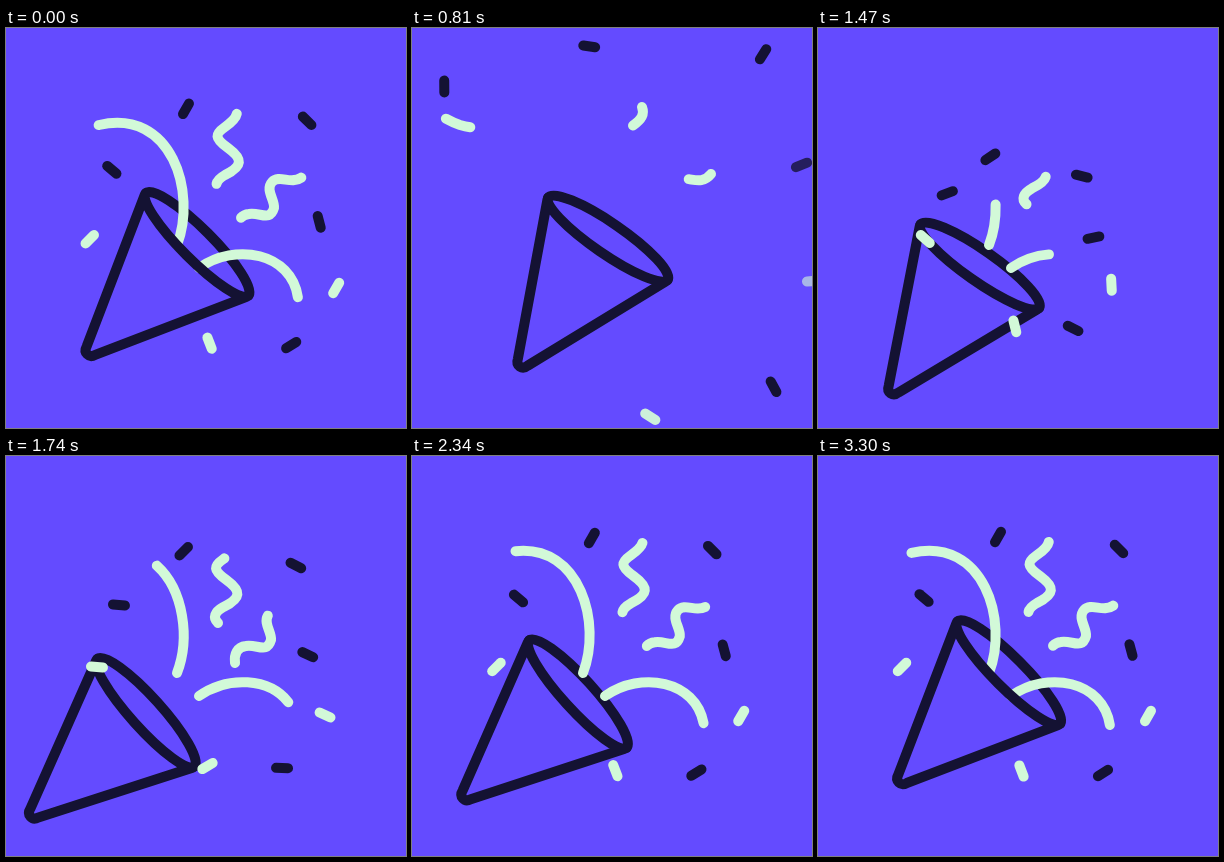
An HTML page with a canvas for the animation above (3330 ms loop, 400 by 400 pixels).

```html
<!DOCTYPE html>
<html lang="en">
<head>
<meta charset="utf-8">
<title>Party popper</title>
<style>
  html, body { margin: 0; height: 100%; overflow: hidden; background: #644bff; }
  canvas { display: block; width: 100vw; height: 100vh; }
</style>
</head>
<body>
<canvas id="stage" width="400" height="400"></canvas>
<script>
const ctx = document.getElementById('stage').getContext('2d');
const LOOP = 3330, BG = '#644bff', DARK = '#141233', LIGHT = '#d2f9d8';
const clamp = v => Math.max(0, Math.min(1, v));
const smooth = v => (v = clamp(v), v * v * (3 - 2 * v));

// Cone pose: time, rim centre x, y, tilt in degrees
const poses = [
  [0, 191, 216.5, 45], [420, 194.5, 213, 41], [850, 196, 210.5, 34],
  [1230, 196.3, 208.8, 30], [1320, 195, 209, 30], [1470, 162, 238, 35],
  [1560, 145, 251, 39.5], [1620, 137, 258, 43.5], [1680, 136, 260, 46.5],
  [1740, 139.8, 256.8, 48], [2160, 155.5, 247.5, 48.6], [2340, 165.8, 238.1, 47.8],
  [2700, 181, 225.6, 46], [2820, 185.5, 221.5, 45.5], [LOOP, 191, 216.5, 45]
];

// Rest pose, travel outwards (by 420 ms), fade end, and offset still left at 1740 ms
const bits = [
  { color: DARK, rest: [180, 81, -60], out: [-2, -45, -90], gone: 1240, left: [-2.3, 14.4, 15], born: 1200 },
  { color: DARK, rest: [301, 93, 45], out: [36, -48, -83], gone: 1360, left: [-11.2, 16.6, -18], born: 1200 },
  { color: DARK, rest: [106, 142, 40], out: [-53, -60, 40], gone: 1090, left: [7, 7, -35], born: 1320 },
  { color: DARK, rest: [313, 194, 75], out: [55, -41, 67], gone: 1000, left: [-11.3, 4.7, -50], born: 1200 },
  { color: DARK, rest: [285, 317, -32], out: [55, 30, -70], gone: 1090, left: [-9, -5, 34], born: 1380 },
  { color: LIGHT, rest: [84, 211, -45], out: [-68, 68, -72], gone: 900, left: [7, 0, 50], born: 1380 },
  { color: LIGHT, rest: [330, 260, -60], out: [51, -5, 45], gone: 960, left: [-11, -1, 85], born: 1380 },
  { color: LIGHT, rest: [203.5, 315, 69], out: [25, 53, -30], gone: 1040, left: [-2, -5, -100], born: 1380 }
];

// Streamers are dashes sliding along fixed curves; tail and head are arc lengths at rest
const streamers = [
  { d: 'M171 217C191 165 166 80 93 97C75 101 62 101 48 97Q36 93 25 85', drift: [0, 0],
    tail: 0, head: 177, push: 74, pull: 245, power: 1.4, start: 1380, tau: 343 },
  { d: 'M193 240C230 214 286 225 292 270C295 290 292 306 288 320Q284 334 276 348', drift: [0, 0],
    tail: 0, head: 123, push: 86, pull: 247, power: 1.4, start: 1380, tau: 226 },
  { d: 'M213.5 163C208 158 210 152 219 147C237 138 237 131 222 120C208 110 209 106 219 99C229 92 233 87 230 79', drift: [-1.5, 4],
    tail: 8, head: 105, push: 12, pull: 110, power: 2.9, start: 1380, tau: 198 },
  { d: 'M232 203C231 194 234 187 243 186C254 184 264 194 268 180C269 172 259 162 266 154C274 145 288 160 299 146', drift: [-3, 4],
    tail: 14, head: 110, push: 10, pull: 104, power: 2.9, start: 1470, tau: 224 }
].map(s => ({ ...s, path: new Path2D(s.d) }));

const burst = (t, tau) => 1 - Math.exp(-t / tau);
const approach = t => Math.exp(-Math.max(0, t - 1290) / 224) / Math.exp(-450 / 224);
const unwind = t => Math.pow((1 - clamp((t - 1290) / 1060)) / (1 - 450 / 1060), 1.5);

function conePose(t) {
  const last = poses.length - 1;
  let i = 0;
  while (i < last - 1 && poses[i + 1][0] <= t) i++;
  const a = poses[i], b = poses[i + 1], span = b[0] - a[0], u = (t - a[0]) / span;
  const slope = (j, k) => {
    const p = poses[Math.max(0, j - 1)], n = poses[Math.min(last, j + 1)];
    return (n[k] - p[k]) / (n[0] - p[0]) * span;
  };
  return [1, 2, 3].map(k =>
    a[k] + (b[k] - a[k]) * u * u * (3 - 2 * u) +
    slope(i, k) * u * (1 - u) * (1 - u) - slope(i + 1, k) * u * u * (1 - u));
}

function drawAt([x, y, angle], draw) {
  ctx.save();
  ctx.translate(x, y);
  ctx.rotate(angle * Math.PI / 180);
  ctx.beginPath();
  draw();
  ctx.stroke();
  ctx.restore();
}

function drawCone(pose, front) {
  ctx.strokeStyle = DARK;
  drawAt(pose, () => {
    if (!front) {
      ctx.ellipse(0, 0, 72.5, 15.7, 0, Math.PI, 2 * Math.PI);
      return;
    }
    ctx.ellipse(0, 0, 72.5, 15, 0, 0, Math.PI);
    ctx.moveTo(-72, 2);
    ctx.lineTo(-6, 150);
    ctx.bezierCurveTo(-4, 157, 4, 157, 6, 150);
    ctx.lineTo(72, 2);
  });
}

function drawStreamer(s, t) {
  const leaving = t < 1200;
  const head = leaving
    ? s.head + s.push * burst(t, 470)
    : s.head * burst(Math.max(0, t - s.start), s.tau);
  const tail = leaving
    ? s.tail + s.pull * Math.pow(t / 900, s.power)
    : s.tail * smooth((t - 1740) / 540);
  if (head - tail < 0.5) return;
  ctx.save();
  if (!leaving) ctx.translate(...s.drift.map(v => v * approach(t)));
  ctx.strokeStyle = LIGHT;
  ctx.setLineDash([head - tail, 9999]);
  ctx.lineDashOffset = -tail;
  ctx.stroke(s.path);
  ctx.restore();
}

function drawBit(color, pose, alpha) {
  if (alpha <= 0) return;
  ctx.globalAlpha = alpha;
  ctx.strokeStyle = color;
  drawAt(pose, () => {
    ctx.moveTo(-6, 0);
    ctx.lineTo(6, 0);
  });
  ctx.globalAlpha = 1;
}

function render(t) {
  ctx.fillStyle = BG;
  ctx.fillRect(0, 0, 400, 400);
  ctx.lineCap = ctx.lineJoin = 'round';
  ctx.lineWidth = 10;

  const cone = conePose(t);
  drawCone(cone, false);
  streamers.forEach(s => drawStreamer(s, t));
  drawCone(cone, true);

  const away = burst(t, 470) / burst(420, 470);
  const spin = burst(t, 300) / burst(420, 300);
  const mix = (b, offset, move, turn) =>
    b.rest.map((v, i) => v + offset[i] * (i < 2 ? move : turn));
  for (const b of bits) {
    drawBit(b.color, mix(b, b.out, away, spin), clamp((b.gone - t) / 240));
    if (t >= b.born) drawBit(b.color, mix(b, b.left, approach(t), unwind(t)), 1);
  }
}

const begin = performance.now();
function tick() {
  render((performance.now() - begin) % LOOP);
  requestAnimationFrame(tick);
}
tick();
</script>
</body>
</html>
```
